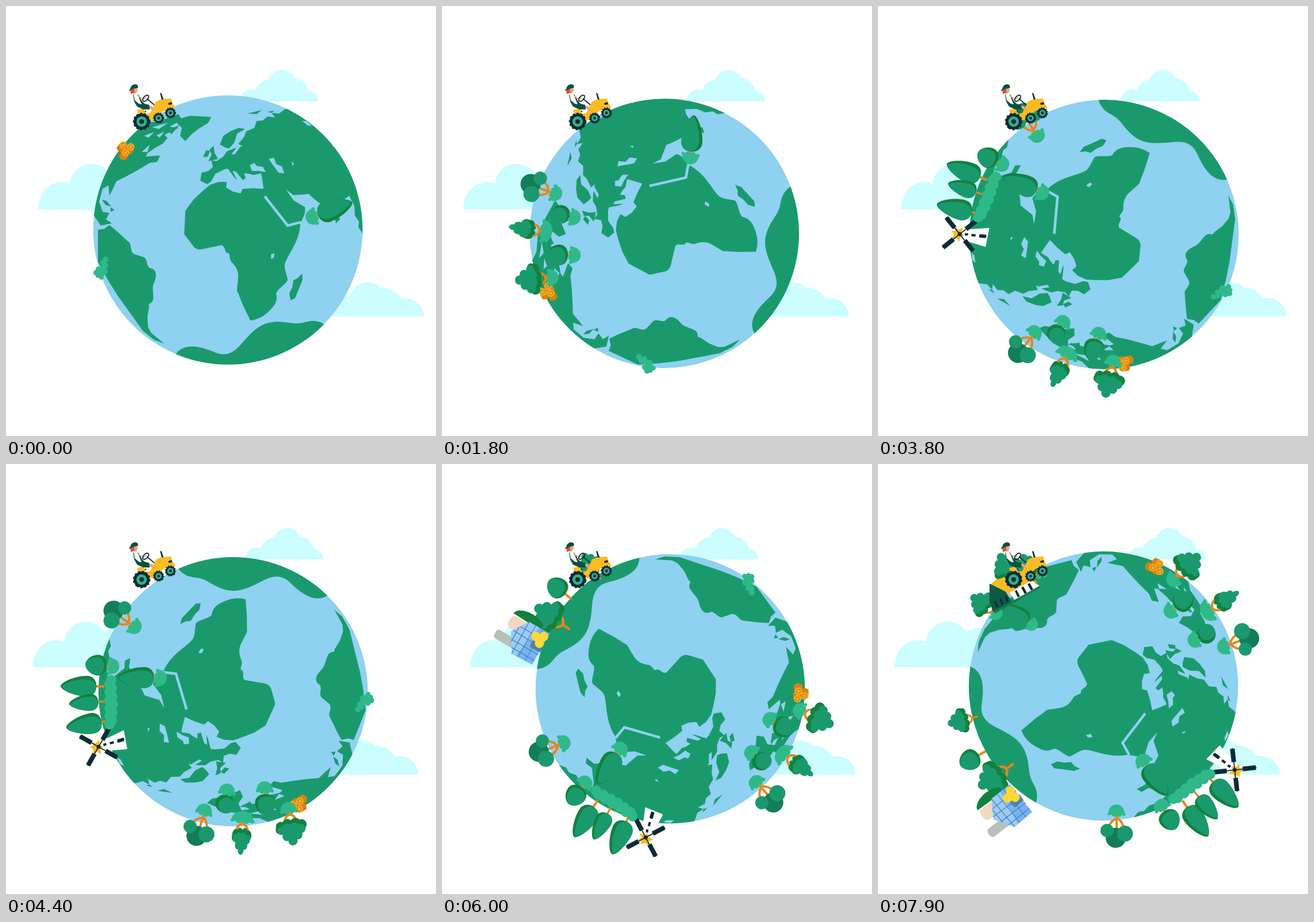
Write an HTML page that moves like this. It is 748x748 px and loops after 8000 ms.

```html
<!DOCTYPE html>
<html lang="en">
<head>
<meta charset="utf-8">
<title>Tractor around the globe</title>
<style>
html, body { margin: 0; width: 100%; height: 100%; overflow: hidden; background: #fff; }
svg { display: block; width: 100vw; height: 100vh; }
.land { fill: #1a9a6c; }
.sea { fill: #8fd1f0; }
.cloud { fill: #ccfdff; }
.dark { fill: #0c2c36; }
.leaf { fill: #1a9a6c; }
.shade { fill: #12813f; }
.deep { fill: #137d57; }
.bush { fill: #2fb98a; }
.gold { fill: #fdbb22; }
.wood { fill: none; stroke: #e5861b; stroke-width: 4; }
.line { fill: none; stroke: #0c2c36; stroke-width: 1.8; }
</style>
</head>
<body>
<svg viewBox="0 0 748 748">
  <defs><clipPath id="disc"><circle cx="386" cy="389.5" r="234.3"/></clipPath></defs>

  <g class="cloud">
    <path id="topCloud" d="M407 166A19 19 0 0 1 434 147A25 25 0 0 1 457 128A24 24 0 0 1 502 126A26 26 0 0 1 526 147A19 19 0 0 1 543 166Z"/>
    <g id="sideClouds">
      <path d="M56 354A41 46 0 0 1 111 309A38 38 0 0 1 181 292A34 34 0 0 1 225 354Z"/>
      <path d="M555 540A30 30 0 0 1 597 507A33 33 0 0 1 652 490A36 36 0 0 1 686 509A33 33 0 0 1 727 540Z"/>
    </g>
  </g>

  <g id="globe" clip-path="url(#disc)">
    <circle class="sea" cx="386" cy="389.5" r="234.3"/>
    <g class="land">
      <path d="M343 321L326 337L312 356L310 397L326 418C331 425 340 424 346 422L375 416C382 419 380 428 385 430C392 430 387 438 392 445C400 453 404 460 404 470C403 490 400 495 404 500L411 518L425 547C437 546 450 540 462 526C473 515 471 505 470 500C472 492 489 483 490 476C488 465 484 458 485 449C490 432 510 412 512 379
        C516 368 522 362 520 350L500 338L487 319L500 329L527 327C535 336 545 342 560 355L570 362L574 378L581 371L577 358L590 335L597 330L606 348L607 365L614 375L613 385L621 397
        L700 397L700 150L486 179L475 187L462 186L468 194L455 192L447 199L436 200L432 212L418 218L414 228L404 240L412 244L396 248L384 253L378 262L366 270L357 268L360 280L352 287L340 290L338 304L350 310L357 305L364 292L380 284L386 283L397 298L402 303L394 287L400 288L412 303L417 299L414 291L424 292L430 294L444 291L446 303L448 318L430 317L412 318L408 326L395 323L383 316L384 306L370 306L355 311Z"/>
      <path d="M372 241L378 226L390 218L405 212L416 214L402 222L397 238L388 248L381 246Z"/>
      <path d="M352 270L358 258L354 250L361 243L363 256L369 266ZM343 263L348 251L355 252L351 262ZM420 187L445 181L436 188ZM455 184l12-2l-5 4z"/>
      <path d="M292 199L320 191L357 193L352 203L336 213L324 222L312 235L303 226L306 212Z"/>
      <path d="M140 330L150 260L200 200L262 202L300 188L306 198L284 210L300 212L276 224L281 230L272 240L262 245L246 256L243 262L268 260L263 271L250 273L230 285L208 297L192 305L186 318L180 330L178 312L168 318L162 340L168 358L180 360L174 371L184 378L165 382L150 360Z"/>
      <path d="M167 337l8 2l8 10l-10-3zM182 350l7 5l-7 3zM280 216l22-9l-14 16z"/>
      <path d="M160 389L170 388L180 381L192 391L215 412C219 420 215 428 224 432L240 437C247 442 243 450 250 456C262 458 263 468 258 480C253 490 257 498 256 510C254 520 246 515 249 523L246 541L247 558L252 568L275 587L258 581L238 565L218 537L195 505L178 478L160 445Z"/>
      <path d="M295 606C310 584 340 593 360 601C394 617 406 589 422 574C448 546 468 547 500 552C515 553 520 549 530 548C542 547 552 552 555 555L555 700L295 700Z"/>
      <path d="M515 465L516 476L503 508L495 512L493 500L498 489L500 477L508 473Z"/>
    </g>
    <g class="sea">
      <path d="M424 277L432 273L436 278L447 280L452 289L440 287L428 287ZM457 266L466 264L470 275L480 279L484 291L474 290L466 279ZM461 432l6-2l-1 8l-5 2zM515 200l8 0l9 9l-7-1zM566 238l9 10l-7-4zM236 254l14-13l-4 13zM262 225l14-7l-9 11zM497 270l4 5l-3 3z"/>
      <path d="M254 211l28-8l-16 11zM240 226l18-7l-10 10zM392 258l11-14l4 2l-9 12z"/>
      <path d="M450 331L490 382L513 376" fill="none" stroke="#8fd1f0" stroke-width="4.5"/>
    </g>
  </g>

  <g id="items"></g>

  <g id="tractor">
    <path class="line" d="M230 186l14-3" stroke-width="3"/>
    <path class="gold" d="M228 181l11-3l5 10l7-2l6-12l4-8l10-4l16-1l3 9l5 7l-12 2l-10 4l-14 16l-10-1l-9-4l-8 0z"/>
    <path class="dark" d="M282 169l6-2l1 4l-6 1zM268 152l2-1l4 11l-3 1z"/>
    <path d="M243 173l11 1l5 8l-4 0l-4-4l-8 0z" fill="#f0a07c"/>
    <path d="M221 153l7-1l5 8l5 11l-10 4l-5-8z" fill="#f4fbf6"/>
    <path d="M221 154l1 0l2 10l7 6l5 1l-7-17l1 0l7 12l4 4l8 2l1 8l-11 0l-11-5l-5-9z" fill="#0b5040"/>
    <path d="M230 157l8 5l5-2" stroke="#f0a07c" stroke-width="2" fill="none"/>
    <path d="M219 143l9-2l1 6l-3 5l-5 0z" fill="#f0a07c"/>
    <path d="M216 145l7-2l0 8l-6 2z" fill="#d84f42"/>
    <path d="M214 148C214 145 217 145 217 141C219 136 227 135 229 138L230 142L222 144Z" fill="#0b5040"/>
    <path class="line" d="M245 161l13 11"/>
    <ellipse class="line" cx="243" cy="160.500" rx="6.500" ry="3.600" transform="rotate(-45 243 160.500)"/>
    <g id="wheels"></g>
  </g>
</svg>

<script>
// The plants turn about a slightly different centre than the globe.
const GLOBE = [391.2, 392], PLANTS = [401, 395];
const SPEED = 36, LOOP = 8, POP_ANGLE = -112, POP_TIME = 0.25;
const byId = id => document.getElementById(id);

const circle = (cls, x, y, r) => `<circle class="${cls}" cx="${x}" cy="${y}" r="${r}"/>`;
const path = (cls, d) => `<path class="${cls}" d="${d}"/>`;
const fill = (color, d) => `<path fill="${color}" d="${d}"/>`;
const dots = (cls, list) => list.map(p => circle(cls, ...p)).join('');
const sized = (sx, sy, shape) => `<g transform="scale(${sx} ${sy})">${shape}</g>`;

// Plants grow from (0,0) towards negative y.
const bush = path('bush', 'M-14 -6C-19 -9 -12 -14 -9 -9C-7 -14 -1 -14 0 -8C2 -14 8 -13 9 -8C14 -13 18 -7 14 -4C13 4 8 9 0 9C-8 9 -13 3 -14 -6Z');
const trunk = path('wood', 'M0 1V-20');
const fork = path('wood', 'M0 1V-14M-11 -30Q-10 -15 0 -13Q10 -15 11 -30');
const crown = dots('shade', [[-18, -33, 9], [-8, -29, 9], [6, -29, 9], [18, -32, 9], [21, -37, 7]]) +
  dots('leaf', [[-16, -40, 8], [-5, -37, 9], [8, -37, 9], [18, -39, 7], [0, -46, 13], [-9, -50, 8], [10, -50, 8], [1, -59, 8]]);
const tall = path('shade', 'M-18 -30C-18 -7 18 -7 18 -29C18 -50 6 -75 -1 -75C-10 -72 -18 -45 -18 -30Z') +
  path('leaf', 'M-18 -30C-18 -8 11 -7 12 -29C12 -48 6 -64 -1 -73C-10 -70 -18 -45 -18 -30Z');
const plump = path('shade', 'M-18 -28C-18 -8 18 -8 18 -28C18 -40 8 -50 0 -50C-8 -50 -18 -40 -18 -28Z') +
  path('leaf', 'M-18 -28C-16 -14 10 -14 13 -27C14 -40 7 -50 0 -50C-8 -50 -18 -40 -18 -28Z');

const blades = [8, 98, 188, 278].map(a =>
  `<g transform="translate(-47 13) rotate(${a - 158.4})"><path class="line" d="M0 0H38"/><path class="dark" d="M14 -4h23v8h-23z"/></g>`).join('');
const log = ([x, y]) =>
  fill('#d98211', `M${x - 6} ${y - 3}l-6 8l4 7l8 1l6 -8z`) +
  `<circle cx="${x}" cy="${y}" r="6.5" fill="#f8ac24"/><circle cx="${x}" cy="${y}" r="3.5" fill="none" stroke="#b96a0d" stroke-width="1.2" stroke-dasharray="3 1"/>`;

const art = {
  tall: trunk + tall,
  tallBush: trunk + tall + bush,
  plump: trunk + plump,
  plumpBush: trunk + plump + bush,
  round: trunk + circle('shade', 2, -26, 16) + circle('leaf', -1, -29, 14) + bush,
  triple: path('wood', 'M0 1V-32M0 -14Q-9 -18 -13 -34M0 -16Q10 -18 14 -30') +
    circle('deep', 2, -49, 17.5) + circle('leaf', -14, -42, 14) + circle('leaf', 17, -36, 11.5) + bush,
  bumpy: fork + crown,
  bumpyBush: fork + crown + bush,
  slimBush: fork + sized(.62, 1, crown) + sized(1.35, 1, bush),
  shrub: dots('bush', [[-9, 9, 5], [-5, 3, 5], [-6, 14, 4], [0, 10, 6], [5, 7, 6], [4, 0, 5], [3, -8, 5], [7, -14, 5], [8, -4, 4], [0, 17, 4]]),
  hedge: dots('bush', [...Array(12)].map((_, i) => [-38 + i * 7, i % 2 ? 3 : -3 + Math.abs(i - 6) / 2, 9])),
  logs: [[-3, -8], [10, -5], [1, 5]].map(log).join(''),
  mill: fill('#fff', 'M-49 6L-3 -16L3 17L-44 21Z') +
    path('dark', 'M-39 8l5 -2l1 4l-5 2zM-28 5l7 -2l1 4l-7 2zM-14 0l10 -3q3 3 1 6l-10 3q-3 -3 -1 -6z') +
    path('gold', 'M-57 4l5 3l6 -7l1 10l6 2l-5 5l1 9l-7 -5l-7 6l1 -10l-6 -4l6 -3z') + blades +
    circle('dark', -47, 13, 3.5),
  plant: fill('#12813f', 'M-75 -28C-75 -43 -38 -51 -20 -38L-20 -28Z') +
    fill('#f0d9c1', 'M-66 -26Q-75 -26 -75 -15Q-75 -3 -66 -3H-45V-26Z') +
    fill('#b6c2b8', 'M-78 9Q-84 9 -84 17Q-84 26 -78 26L-46 25V8Z') +
    fill('#77b2f4', 'M-62 1L-44 -30L-3 -32L0 30L-40 33Z') +
    fill('#9acbfb', 'M-44 -30L-24 -31L-32 32L-40 33L-62 1Z') +
    fill('#4b82a8', 'M-22 -6L0 -8V5L-20 6Z') +
    '<path d="M-53 -15L-1 -17M-60 -3H0M-54 12L0 10M-46 24L0 22M-44 -30L-40 33M-31 -31L-28 32M-17 -32L-14 31M-54 -13L-52 15" fill="none" stroke="#4b82b0" stroke-width="1.300"/>' +
    '<g fill="#fbd934">' + dots('', [[-21, -15, 8], [-9, -22, 8], [-9, -8, 8]]) + '</g>',
  barn: path('gold', 'M-54 -22L-46 -30L10 -48L18 -22L-18 -4Z') +
    fill('#0b5a45', 'M-56 -24L-28 -10L-17 8L-50 25L-56 6Z') +
    fill('#fff', 'M-21 -8L18 -30L31 -20L-12 5Z') +
    path('dark', 'M-48 8l3 -2l4 10l-3 2zM-39 3l3 -2l4 10l-3 2zM-30 -2l3 -2l4 10l-3 2zM-12 -11l3 -2l6 11l-4 2zM-1 -17l4 -2l6 11l-4 2zM10 -23l4 -2l6 11l-4 2z') +
    path('deep', 'M-50 25L31 -20L33 -17L-46 28Z')
};

// [art, time, x, y, scale, tilt]; tilt null keeps the upright drawing, else it faces outward.
const fixed = [
  ['shrub', 0, 166, 455, 1, null],
  ['logs', 0, 207, 250, 1, null],
  ['tallBush', 3.8, 288, 326, 1.02, -8]
];
const growing = [
  ['slimBush', 4.4, 412, 613, 1, 6],
  ['bumpyBush', 4.4, 491, 597, 1, 15],
  ['round', 4.4, 385, 565, 1, 0],
  ['plumpBush', 4.4, 450, 561, 1, 14],
  ['triple', 4.4, 346, 600, 1, 0],
  ['mill', 4.4, 208, 479, 1, null],
  ['plumpBush', 6, 251, 552, 1, -6],
  ['tall', 6.9, 393, 626, 1, -1],
  ['tall', 6.9, 419, 625, .82, 1],
  ['tall', 6.9, 453, 617, 1, 5],
  ['hedge', 6.9, 420, 613, 1, null],
  ['triple', 6.9, 291, 570, 1, 3],
  ['bumpy', 6.9, 191, 297, .8, -4],
  ['plump', 6.9, 166, 354, 1, -3],
  ['bumpy', 6.9, 192, 400, 1.08, 2],
  ['plant', 6.9, 170, 457, 1, null],
  ['bumpyBush', 7.9, 208, 262, .85, 0],
  ['tallBush', 7.9, 270, 281, .85, -6],
  ['bumpy', 7.9, 242, 211, .95, 10],
  ['barn', 7.9, 250, 232, 1, null],
  ['bumpy', 7.9, 276, 208, .85, 6]
];

function addItem([name, time, x, y, scale, tilt], pivot, grows) {
  const node = document.createElementNS('http://www.w3.org/2000/svg', 'g');
  node.innerHTML = art[name];
  byId('items').append(node);
  const angle = Math.atan2(y - pivot[1], x - pivot[0]) * 180 / Math.PI;
  const past = angle > POP_ANGLE ? angle - 360 : angle;
  const start = grows ? Math.max(0.2, time + (past - POP_ANGLE) / SPEED) : -9;
  const turn = tilt === null ? 0 : angle + 90 + tilt;
  return { node, time, x, y, scale, turn, start, pivot };
}

const items = [
  ...fixed.map(item => addItem(item, item[0] === 'tallBush' ? PLANTS : GLOBE, false)),
  ...growing.map(item => addItem(item, PLANTS, true))
];

const wheels = [[236, 201, 14], [265.5, 195, 8.5], [286, 186, 8.5]].map(([x, y, r]) => {
  byId('wheels').insertAdjacentHTML('beforeend',
    `<g>${circle('dark', x, y, r)}<circle cx="${x}" cy="${y}" r="${r}" fill="none" stroke="#0c2c36" stroke-width="2.500" stroke-dasharray="${r / 4}"/>` +
    `<circle cx="${x}" cy="${y}" r="${r * .47}" fill="none" stroke="#2fb08a" stroke-width="${r * .36}"/></g>`);
  return { node: byId('wheels').lastChild, x, y, r };
});

const spin = (deg, pivot) => `rotate(${deg} ${pivot})`;

function draw(t) {
  byId('globe').setAttribute('transform', spin(-SPEED * t, GLOBE));
  for (const { node, time, x, y, scale, turn, start, pivot } of items) {
    const p = Math.min(1, Math.max(0, (t - start) / POP_TIME));
    const size = scale * (1 - (1 - p) ** 3);
    node.setAttribute('visibility', p ? 'visible' : 'hidden');
    node.setAttribute('transform', `${spin(-SPEED * (t - time), pivot)} translate(${x} ${y}) rotate(${turn}) scale(${size})`);
  }
  for (const { node, x, y, r } of wheels) {
    node.setAttribute('transform', spin(SPEED * t * 234 / r, [x, y]));
  }
  const phase = t % 5.3;
  const drift = 10.57 * Math.min(phase, 5.3 - phase);
  byId('topCloud').setAttribute('transform', `translate(${drift} 0)`);
  byId('sideClouds').setAttribute('transform', `translate(${-drift} 0)`);
}

function tick() {
  // The motion advances ten times a second.
  draw(Math.floor(performance.now() / 100) / 10 % LOOP);
  requestAnimationFrame(tick);
}
tick();
</script>
</body>
</html>
```
